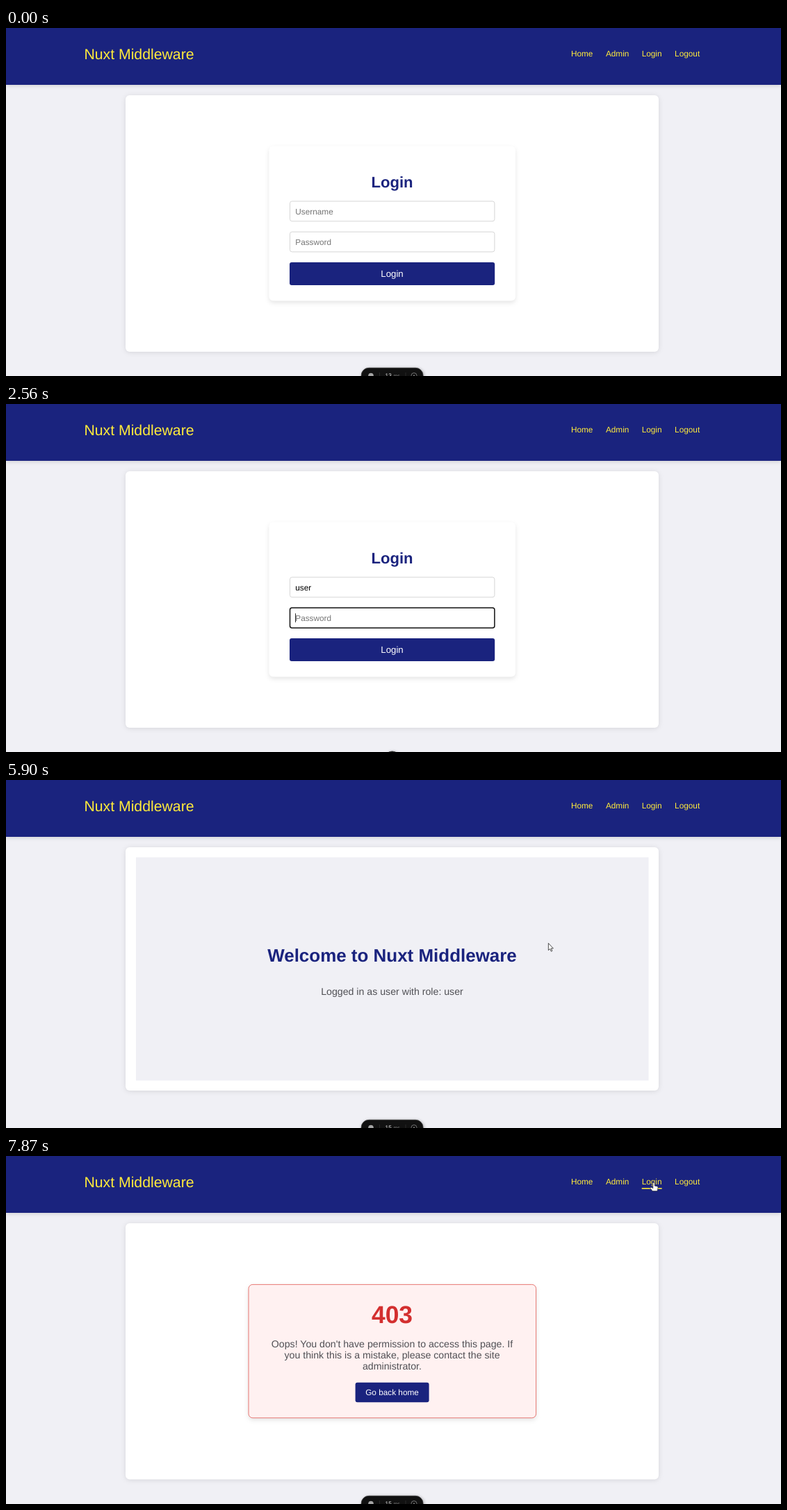
An HTML page that plays this animation: 1115x502 px, repeating every 8 s.

```html
<!DOCTYPE html>
<html lang="en">
<head>
<meta charset="utf-8">
<title>Nuxt Middleware</title>
<style>
  html, body { margin: 0; width: 100%; height: 100%; overflow: hidden; background: #f0f0f5; }
  svg { display: block; width: 1115px; height: 502px; }
  text { font: 11.8px "Liberation Sans", Arial, sans-serif; text-rendering: geometricPrecision; white-space: pre; }
  .mid { text-anchor: middle; }
  .navy { fill: #1a237e; }
  .yellow { fill: #ffeb3b; }
  .white { fill: #fff; }
  .hint { fill: #757575; }
  .field { fill: #fff; stroke: #ccc; stroke-width: .8; }
  .field.focus { stroke: #101010; stroke-width: 1.5; }
  .big { font-size: 14.16px; }
  .grey { fill: #505055; }
  .panel { fill: #fff; filter: drop-shadow(0 1px 3.5px rgba(0, 0, 0, .11)); }
  .card { filter: drop-shadow(0 3px 3px rgba(0, 0, 0, .1)); }
  .pill { fill: #111; stroke: #3a3a3a; stroke-width: .7; filter: drop-shadow(1px 1px 2px rgba(0, 0, 0, .35)); }
  .line { fill: none; stroke: #222; }
</style>
</head>
<body>
<svg viewBox="0 0 1115 502">
  <defs><clipPath id="selClip"><rect id="selArea" y="297" height="16.3"/></clipPath></defs>
  <rect class="navy" width="1115" height="82" style="filter:drop-shadow(0 1.5px 3px rgba(0,0,0,.15))"/>
  <text class="yellow" x="112.4" y="44.6" style="font-size:21.24px">Nuxt Middleware</text>
  <g class="yellow">
    <text x="812.9" y="40.8">Home</text>
    <text x="862.9" y="40.8">Admin</text>
    <text x="914.7" y="40.8">Login</text>
    <text x="962.1" y="40.8">Logout</text>
    <rect id="adminLine" x="862.9" y="46" width="33.4" height="1.6"/>
    <rect id="loginLine" x="914.7" y="46" width="28.9" height="1.6"/>
  </g>
  <rect id="panel" class="panel" x="172" y="97" width="767" height="370" rx="5.9"/>

  <g id="loginPage">
    <rect class="white card" x="378.5" y="170.5" width="354.5" height="223" rx="5.9"/>
    <text class="navy mid" x="555.5" y="229.9" style="font-size:22.1px;font-weight:bold">Login</text>
    <rect id="userField" class="field" x="408.5" y="249.9" width="294.4" height="28.8" rx="3"/>
    <rect id="passField" class="field" x="408.5" y="294.1" width="294.4" height="28.8" rx="3"/>
    <text id="userText" x="416.3" y="268.5"></text>
    <text id="passText" x="416.3" y="312.6"></text>
    <path id="caret" stroke="#000" stroke-width=".8"/>
    <g id="eye" class="line" stroke-width="1.2">
      <path d="M678.8 310.2C680.5 302.4 690.5 302.4 692.2 310.2"/>
      <circle cx="685.5" cy="310.3" r="2.9"/>
    </g>
    <rect class="navy" x="408" y="338" width="295.2" height="33" rx="3"/>
    <text class="white mid" x="555.5" y="358.9" style="font-size:13.28px">Login</text>
  </g>

  <g id="homePage">
    <rect x="187" y="111.5" width="737.5" height="322" fill="#f0f0f5"/>
    <text class="navy mid" x="555.5" y="262.3" style="font-size:25.96px;font-weight:bold">Welcome to Nuxt Middleware</text>
    <text class="mid big grey" x="555.5" y="309.8">Logged in as user with role: user</text>
    <g clip-path="url(#selClip)">
      <rect x="560" y="290" width="110" height="30" fill="#2b63cb"/>
      <text class="mid big white" x="555.5" y="309.8">Logged in as user with role: user</text>
    </g>
  </g>

  <g id="errorPage">
    <rect class="card" x="349" y="185.4" width="413.6" height="192.4" rx="5.9" fill="#fff1f1" stroke="#e56a66" stroke-width=".9"/>
    <text class="mid" x="555.5" y="240.7" fill="#d32f2f" style="font-size:35.4px;font-weight:bold">403</text>
    <g class="grey">
      <text class="mid big" x="555.5" y="275.6">Oops! You don't have permission to access this page. If</text>
      <text class="mid big" x="555.5" y="292">you think this is a mistake, please contact the site</text>
      <text class="mid big" x="555.5" y="308.4">administrator.</text>
    </g>
    <rect class="navy" x="502.6" y="326.8" width="106" height="28.4" rx="3"/>
    <text class="white mid" x="555.5" y="345.1">Go back home</text>
  </g>

  <rect id="pill" class="pill" height="22" rx="11"/>
  <g id="pillInfo">
    <circle cx="525" cy="501.5" r="3.8" fill="#a5a5a5"/>
    <path d="M537.5 497V506M575 497V506" stroke="#333" stroke-width=".7"/>
    <text id="delay" x="545.6" y="504" fill="#ddd" style="font-size:8.2px"></text>
    <text x="557.6" y="504" fill="#888" style="font-size:6.8px">ms</text>
    <circle cx="587" cy="501.5" r="4" fill="none" stroke="#888" stroke-width=".8"/>
    <circle cx="587" cy="501.5" r="1" fill="#888"/>
  </g>

  <circle id="press" r="9" fill="rgb(230,220,0)" fill-opacity=".55"/>
  <g id="cursor">
    <path id="arrow" class="white" stroke="#222" stroke-width=".8" d="M0 0V10.2L2.3 8.1 4 11.8 5.5 11.1 3.9 7.5H7Z"/>
    <path id="beam" class="line" stroke-width=".9" d="M-2 -4.8Q0 -4.8 0 -4V4Q0 4.8 -2 4.8M2 -4.8Q0 -4.8 0 -4M0 4Q0 4.8 2 4.8"/>
    <path id="hand" class="white" stroke="#222" stroke-width=".6" d="M-1.2 .8Q0 -.6 1.2 .8V5L5 5.8Q6.2 6.2 6 7.6L5 12.6H-2L-5 8.4Q-4.6 6.6 -2.8 7.6L-1.2 8.8Z"/>
  </g>
</svg>
<script>
const LOOP = 8000, HOME_AT = 4160, ERROR_AT = 7080;
const el = {};
document.querySelectorAll('[id]').forEach(node => el[node.id] = node);

// time, x, y and shape held until the next point
const track = [
  [0, 978, 485, ''], [120, 978, 485, 'arrow'], [260, 830, 450, 'arrow'], [400, 700, 405, 'arrow'],
  [470, 647, 360, 'hand'], [540, 590, 312, 'beam'], [610, 547, 252, 'beam'], [810, 547, 252, 'beam'],
  [950, 558, 254, 'beam'], [2560, 558, 254, ''], [3970, 557, 253, 'arrow'], [4160, 557, 253, 'arrow'],
  [4300, 557, 247, 'arrow'], [5060, 557, 247, 'arrow'], [5480, 875, 58, 'arrow'], [5620, 860, 110, 'arrow'],
  [5900, 781, 235, 'arrow'], [6040, 690, 298, 'arrow'], [6110, 683, 304, 'beam'], [6380, 577, 304, 'beam'],
  [6420, 577, 304, 'arrow'], [6640, 868, 46, 'hand'], [6700, 880, 38, 'hand'], [7590, 880, 38, 'hand'],
  [7660, 897, 43, 'arrow'], [7730, 917, 44, 'hand'], [7870, 932, 38, 'hand'], [LOOP, 932, 38, 'hand']
];
const userKeys = [1830, 1960, 2220, 2290];
const passKeys = [3020, 3220, 3440, 3570];
const presses = [[1020, 1200], [6110, 6380], [6830, 7020]];

const within = (t, from, to) => t >= from && t < to;
const ramp = (t, from, to) => {
  const k = Math.min(1, Math.max(0, (t - from) / (to - from)));
  return k * k * (3 - 2 * k);
};
const show = (node, on) => node.setAttribute('visibility', on ? 'visible' : 'hidden');
const display = (node, on) => node.style.display = on ? '' : 'none';
const set = (node, attrs) => {
  for (const key in attrs) node.setAttribute(key, attrs[key]);
};

function pointer(t) {
  const i = track.findIndex((p, n) => n === track.length - 1 || t < track[n + 1][0]);
  const a = track[i], b = track[i + 1] || a;
  const k = (t - a[0]) / (b[0] - a[0] || 1);
  return { x: a[1] + (b[1] - a[1]) * k, y: a[2] + (b[2] - a[2]) * k, shape: a[3] };
}

function fill(node, keys, value, hint, t) {
  const count = keys.filter(k => t >= k).length;
  node.textContent = count ? value.slice(0, count) : hint;
  node.setAttribute('class', count ? '' : 'hint');
  return count ? node.getComputedTextLength() : 0;
}

function drawForm(t) {
  const inPass = t >= 2560;
  el.userField.classList.toggle('focus', t >= 1020 && !inPass);
  el.passField.classList.toggle('focus', inPass);
  const userWidth = fill(el.userText, userKeys, 'user', 'Username', t);
  const passWidth = fill(el.passText, passKeys, '••••', 'Password', t);
  const x = 416.5 + (inPass ? passWidth : userWidth), y = inPass ? 302 : 258;
  el.caret.setAttribute('d', `M${x} ${y}v13`);
  show(el.caret, t >= userKeys[0]);
  show(el.eye, t >= passKeys[0]);
}

function drawPill(t) {
  const open = 1 - ramp(t, 1200, 1480) + ramp(t, HOME_AT, 4290);
  const width = 22 + 67 * open;
  set(el.pill, { x: 555.6 - width / 2, y: 501 - 10.7 * open, width });
  set(el.pillInfo, { opacity: open ** 3, transform: `translate(0 ${10.7 * (1 - open)})` });
  el.delay.textContent = t < HOME_AT ? '13' : '15';
}

function draw(t) {
  const page = t < HOME_AT ? 'login' : t < ERROR_AT ? 'home' : 'error';
  for (const name of ['login', 'home', 'error']) display(el[name + 'Page'], page === name);
  el.panel.setAttribute('height', { login: 370, home: 351, error: 369.5 }[page]);
  if (page === 'login') drawForm(t);
  drawPill(t);

  const p = pointer(t);
  el.cursor.setAttribute('transform', `translate(${p.x} ${p.y})`);
  for (const shape of ['arrow', 'beam', 'hand']) show(el[shape], p.shape === shape);
  set(el.press, { cx: p.x, cy: p.y });
  show(el.press, presses.some(([from, to]) => within(t, from, to)));
  show(el.adminLine, within(t, 6640, 7660));
  show(el.loginLine, t >= 7730);

  const left = t < 6110 ? 658 : t < 6380 ? Math.max(580, Math.min(658, p.x)) : 580;
  set(el.selArea, { x: left, width: 658 - left });
}

function tick() {
  draw(performance.now() % LOOP);
  requestAnimationFrame(tick);
}
tick();
</script>
</body>
</html>
```
